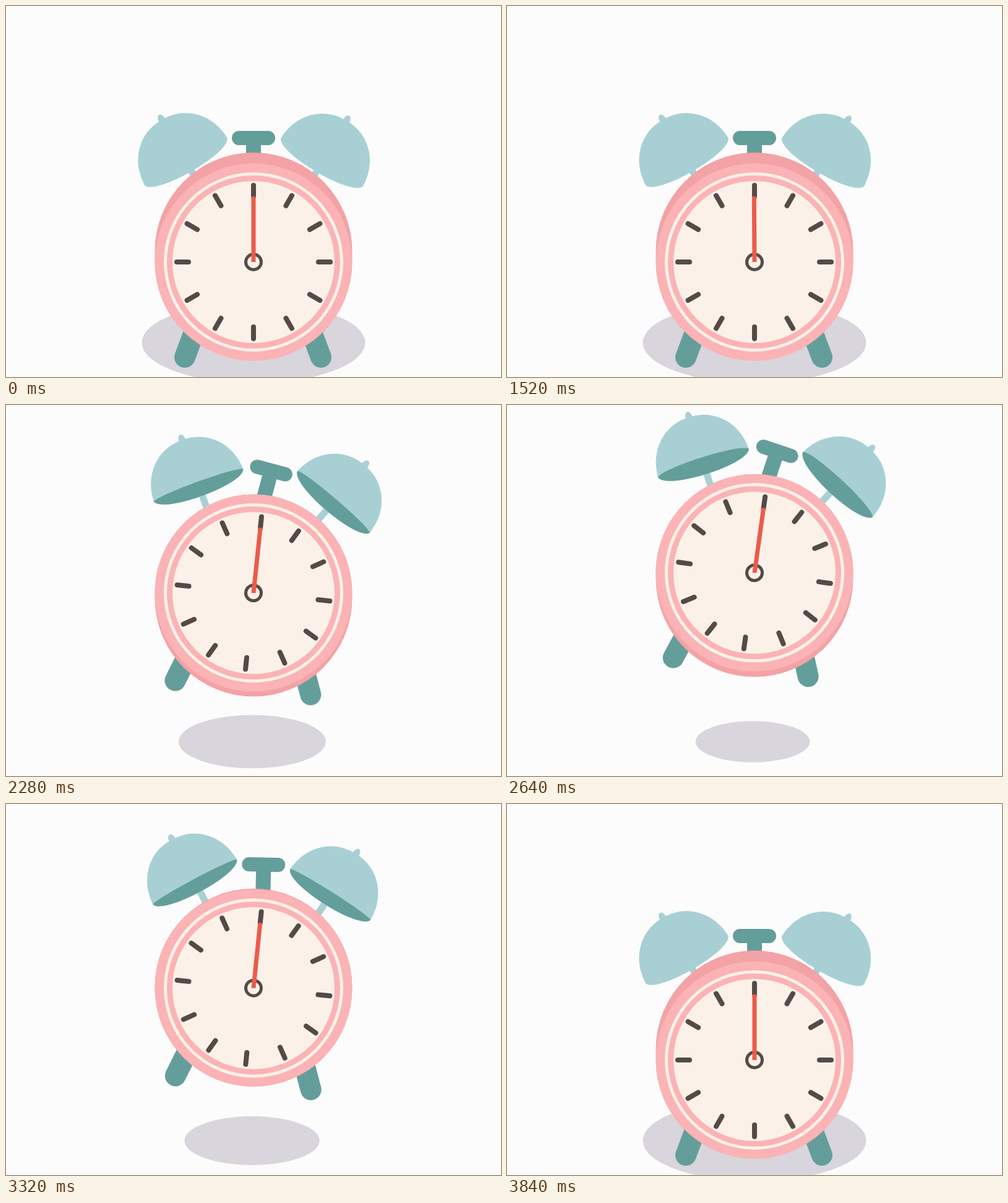
An HTML page for the animation above (4000 ms loop, 800 by 600 pixels).

```html
<!DOCTYPE html>
<html lang="en">
<head>
<meta charset="utf-8">
<title>Alarm clock</title>
<style>
  html, body { margin: 0; width: 100%; height: 100%; overflow: hidden; background: #fcfcfc; }
  svg { display: block; width: 100vw; height: 100vh; }
  .teal { fill: #649e9a; }
  .bell { fill: #a8d0d4; }
  .dome { stroke: #a8d0d4; stroke-width: 2; stroke-linejoin: round; }
  .ink { stroke: #544a47; fill: none; }
</style>
</head>
<body>
<svg viewBox="0 0 800 600">
  <defs>
    <g id="leg"><rect x="-17" y="-60" width="34" height="77" rx="17"/></g>
    <g id="cup">
      <rect x="-5.5" y="0" width="11" height="52"/>
      <ellipse cx="0" cy="-78" rx="5.5" ry="9"/>
      <path class="dome" d="M-76,0 C-74,-45 -43,-77 0,-77 C43,-77 74,-45 76,0 C68,23 -68,23 -76,0Z"/>
    </g>
  </defs>
  <ellipse id="shadow" cy="544.5" fill="#d8d5dc"/>
  <g id="clock">
    <g id="legs" class="teal">
      <use href="#leg" transform="translate(-111,154) rotate(20.5)"/>
      <use href="#leg" transform="translate(109,154) rotate(-20.5)"/>
    </g>
    <g id="left" class="bell"><use href="#cup"/><path class="lens teal"/></g>
    <g id="right" class="bell"><use href="#cup"/><path class="lens teal"/></g>
    <g id="button" class="teal">
      <rect x="-35" y="-62" width="70" height="23" rx="11.5"/>
      <rect x="-12" y="-45" width="24" height="50"/>
    </g>
    <line id="back" x1="0" y1="0" x2="0" stroke="#f3a2a6" stroke-width="319" stroke-linecap="round"/>
    <circle r="159.5" fill="#fbb3b5"/>
    <circle r="142.5" fill="none" stroke="#fcf1e8" stroke-width="5"/>
    <circle r="131" fill="#fcf1e8"/>
    <g id="dial">
      <g id="ticks" class="ink" stroke-width="8" stroke-linecap="round"></g>
      <circle class="ink" r="12.5" stroke-width="5"/>
      <rect id="hand" x="-3.5" y="-106" width="7" height="106" fill="#ec5a4c"/>
    </g>
  </g>
</svg>
<script>
const LOOP = 4000, STEP = 40, SPIN = 1555, GROUND = 585;
const $ = id => document.getElementById(id);
const set = (id, attrs) => {
  for (const k in attrs) $(id).setAttribute(k, attrs[k]);
};
const place = (id, transform) => set(id, { transform });

for (let a = 0; a < 360; a += 30) {
  const tick = document.createElementNS("http://www.w3.org/2000/svg", "path");
  tick.setAttribute("d", "M0,-105V-124");
  tick.setAttribute("transform", `rotate(${a})`);
  $("ticks").append(tick);
}

// Smooth curve through [time, value] keys, without overshoot.
function track(...keys) {
  const slope = i => (keys[i + 1][1] - keys[i][1]) / (keys[i + 1][0] - keys[i][0]);
  const tangent = i => {
    if (i === 0 || i === keys.length - 1) return 0;
    const a = slope(i - 1), b = slope(i);
    return a * b <= 0 ? 0 : 2 * a * b / (a + b);
  };
  return t => {
    const n = keys.length - 1;
    if (t <= keys[0][0]) return keys[0][1];
    if (t >= keys[n][0]) return keys[n][1];
    let i = 0;
    while (t > keys[i + 1][0]) i++;
    const [t0, v0] = keys[i], [t1, v1] = keys[i + 1];
    const d = t1 - t0, s = (t - t0) / d, r = 1 - s;
    return v0 * r * r * (1 + 2 * s) + v1 * s * s * (3 - 2 * s)
      + d * s * r * (r * tangent(i) - s * tangent(i + 1));
  };
}

const height = track([2040, 414], [2240, 315], [2280, 304], [2560, 275], [2820, 267],
  [3040, 276], [3360, 302], [3520, 332], [3600, 362], [3690, 414]);
const lean = track([2040, 0], [2280, 6], [2700, 8], [3040, 7.4], [3360, 5.6], [3520, 4.5], [3690, 0]);
const wobble = track([2040, 0], [2180, 10], [2280, 4], [2480, -11], [2700, 8], [2900, -10],
  [3040, -5], [3160, 8], [3320, -4], [3520, 10], [3690, 0]);
const depth = track([2040, -17.5], [2280, 8], [2700, 9], [3040, 7.5], [3360, -3], [3520, -11], [3690, -17.5]);
const rim = track([2040, 17], [2280, -6], [2700, -10], [3040, -9], [3360, -4], [3520, 0], [3690, 17]);
const spread = track([2040, 180.5], [2280, 119], [2560, 97], [2820, 86], [3040, 90],
  [3360, 113], [3520, 137], [3690, 180.5]);
const squash = track([1560, 0], [1680, 0.06], [1900, 0.17], [2080, 0], [3690, 0], [3740, 0.1], [3840, 0]);

const easeInOut = p => p < 0.5 ? 2 * p * p : 1 - 2 * (1 - p) * (1 - p);

function draw(t) {
  const y = height(t), turn = lean(t), w = wobble(t), q = squash(t), rx = spread(t);
  const upper = rim(t) * 4 / 3;

  set("shadow", { cx: 400 - 6 * (1 - rx / 180.5), rx, ry: rx * 0.361 });
  place("clock", `translate(400,${GROUND}) scale(${1 + q},${1 - 0.8 * q}) translate(0,${y - GROUND})`);
  place("legs", `rotate(${turn})`);
  place("dial", `rotate(${turn})`);
  place("left", `rotate(${turn - 35}) translate(0,-153) rotate(${5 + w}) translate(0,-43)`);
  place("right", `rotate(${turn + 35.5}) translate(0,-153) rotate(${w - 5}) translate(0,-43)`);
  place("button", `rotate(${turn}) translate(0,-150) rotate(${1.7 * w + 0.35 * turn - turn * (turn ? 0 : 1)})`);
  set("back", { y2: depth(t) });
  place("hand", `rotate(${360 * easeInOut(Math.min(t / SPIN, 1))})`);

  for (const lens of document.querySelectorAll(".lens")) {
    lens.setAttribute("d", `M-77,0 C-68,${upper} 68,${upper} 77,0 C68,24 -68,24 -77,0Z`);
    lens.style.display = rim(t) > 16.5 ? "none" : "";
  }
}

const start = performance.now();
function frame() {
  const t = (performance.now() - start) % LOOP;
  draw(Math.floor(t / STEP) * STEP);
  requestAnimationFrame(frame);
}
frame();
</script>
</body>
</html>
```
